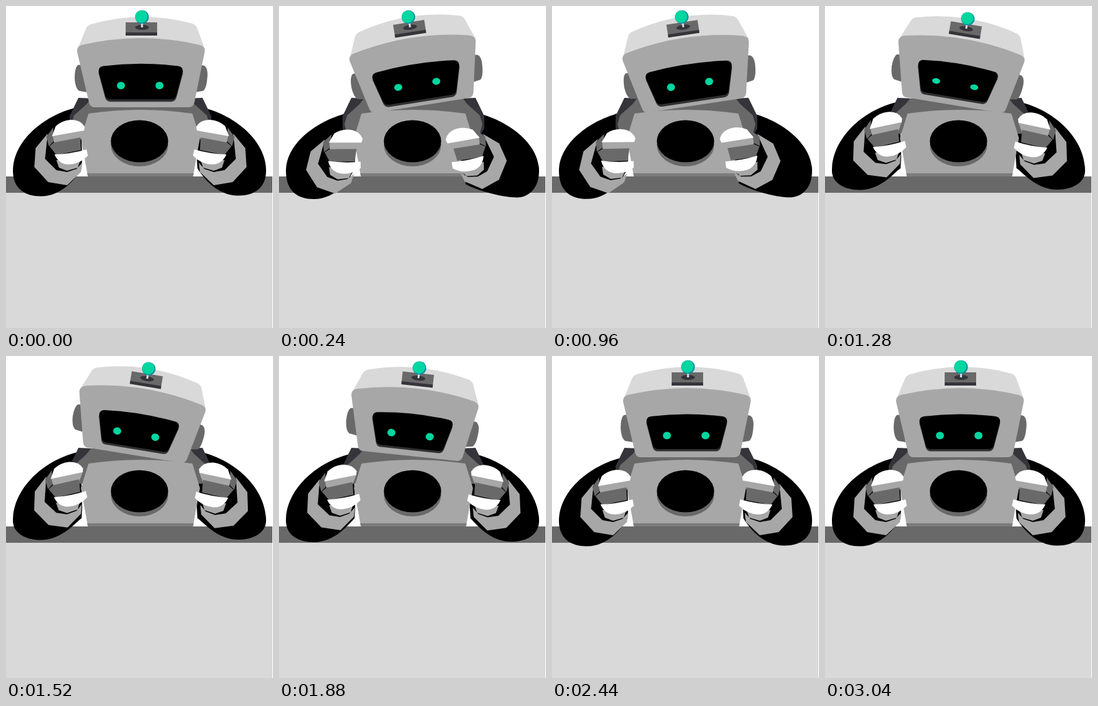
Recreate the animation shown at these times as an HTML page. Size 424 px wide and 512 px high, loop 3080 ms.

```html
<!DOCTYPE html>
<html lang="en">
<head>
<meta charset="utf-8">
<title>Robot at a desk</title>
<style>
  html, body { margin: 0; width: 100%; height: 100%; overflow: hidden; background: #fff; }
  svg { display: block; width: 424px; height: 512px; }
  .light { fill: #d9d9d9; }
  .mid { fill: #a7a7a7; }
  .deep { fill: #696969; }
  .ink { fill: #34343a; }
  .glow { fill: #00d6a0; }
  .white { fill: #fff; }
</style>
</head>
<body>
<svg viewBox="0 0 424 512">
  <defs>
    <g id="hand">
      <path d="M66 206L58 245L72 264L97 268L116 256L112 225L80 205Z"/>
      <path class="mid" d="M66 203L47 226L45 256L67 280L97 285L119 264L121 249L112 259L97 264L80 261L62 243L64 224Z"/>
      <path class="deep" d="M75 193L64 208L68 223L76 215Z"/>
      <path class="mid" d="M74 206L125 196L118 213L77 220Z"/>
      <path class="deep" d="M76 217L118 209L119 229L80 237L69 223Z"/>
      <path class="mid" d="M80 245L118 245L114 257L97 262L84 257Z"/>
      <path class="white" d="M73 207L79 191Q89 182 102 181Q118 180 125 192L124 198Z"/>
      <path class="white" d="M77 236Q104 235 128 228L130 238Q118 251 100 252Q84 252 77 236Z"/>
    </g>
    <g id="shoulder">
      <path class="ink" d="M139 147L115 146L101 175L101 195L109 208L125 190Z"/>
      <path class="deep" d="M216 147L135 147L128 156L108 174L104 188L108 203L216 203Z"/>
    </g>
    <path id="visor" d="M150 104Q150 97 157 96Q214 89 271 96Q278 97 278 104L268 142Q266 148 260 148L168 148Q162 148 160 142Z"/>
  </defs>

  <rect class="deep" y="271" width="423" height="27"/>
  <rect class="light" y="297" width="423" height="215"/>

  <path id="armL"/>
  <path id="armR" transform="matrix(-1 0 0 1 424 0)"/>

  <use href="#shoulder"/>
  <use href="#shoulder" transform="matrix(-1 0 0 1 427 0)"/>
  <path class="mid" d="M131 171Q213 159 296 171L308 210L297 271L130 271L119 210Z"/>
  <path fill="#7c7c7c" d="M129 266H298L297 271H130Z"/>
  <ellipse class="deep" cx="212" cy="221" rx="45.500" ry="34"/>
  <ellipse cx="212" cy="215" rx="45.500" ry="33.500"/>

  <use id="handL" href="#hand"/>
  <g id="handR"><use href="#hand" transform="matrix(-1 0 0 1 427 0)"/></g>

  <g id="head">
    <path class="deep" d="M122 93L114 94Q109 98 109 115Q110 131 116 135L128 137Z"/>
    <path class="deep" d="M307 93L315 95Q320 98 320 109Q319 131 313 135L301 137Z"/>
    <path class="light" d="M113 70L127 36Q129 31 135 29Q215 6 296 28Q302 30 304 36L316 69L215 80Z"/>
    <path class="mid" d="M113 73Q112 65 120 62Q215 40 308 62Q317 65 315.500 73L299 154Q297 161 290 161H140Q134 161 132 154Z"/>
    <path class="deep" d="M190 26H240V43H190Z"/>
    <path class="ink" d="M190 42H240V47H190Z"/>
    <ellipse class="ink" cx="216" cy="34" rx="11" ry="4"/>
    <path fill="#d5e5ef" d="M214.500 25H217.500V34H214.500Z"/>
    <circle fill="#0d8fa3" cx="216" cy="17.500" r="10.800"/>
    <circle class="glow" cx="215" cy="16.800" r="9.800"/>
    <g id="face">
      <use href="#visor" y="3.500" fill="#303033"/>
      <use href="#visor"/>
    </g>
    <ellipse class="glow eye" cx="182.500" cy="126.500" rx="6.400"/>
    <ellipse class="glow eye" cx="243.700" cy="126.500" rx="6.400"/>
  </g>
</svg>
<script>
const LOOP = 3080;
// [time, lean]: -1 leans left, 1 leans right
const LEAN = [[0, 0], [60, 0], [240, -1], [420, -1.06], [960, -.95], [1160, .08], [1280, 1],
              [1480, 1], [1880, .65], [2230, -.5], [2440, 0], [LOOP, 0]];
const EYE = [[0, 6], [240, 5.5], [960, 6], [1160, 6], [1280, 4.6], [1440, 6], [LOOP, 6]];
const VISOR = [[0, 1.045], [240, 1.09], [960, 1.08], [1280, 1], [LOOP, 1]];
const $ = id => document.getElementById(id);
const eyes = document.querySelectorAll('.eye');

function track(keys, t) {
  const i = keys.findIndex(k => k[0] > t);
  const [t0, v0] = keys[i - 1], [t1, v1] = keys[i];
  const u = (t - t0) / (t1 - t0);
  return v0 + (v1 - v0) * u * u * (3 - 2 * u);
}

const mix = (left, right, p) => p < 0 ? -p * left : p * right;

function arm(bottom, lift, reach) {
  return `M118 ${160 - lift}C60 ${172 - lift} 11 ${215 - lift / 2} 11 262
    C11 ${bottom - 12} 30 ${bottom} ${55 - 9 * reach} ${bottom}
    C${90 - 20 * reach} ${bottom} 112 ${bottom - 30 + 18 * reach} ${120 + 8 * reach} ${258 + 25 * reach}L121 240Z`;
}

function moveHand(id, cx, p, left, right) {
  const [x, y, turn] = left.map((v, i) => mix(v, right[i], p));
  $(id).setAttribute('transform', `translate(${x} ${y}) rotate(${turn} ${cx} 235)`);
}

function draw(now) {
  const t = now % LOOP, p = track(LEAN, t);
  const lift = mix(-8, 8, p);
  $('armL').setAttribute('d', arm(302.5 + mix(4.5, -10, p), lift, 0));
  $('armR').setAttribute('d', arm(301.5 + mix(3, -9.5, p), lift, Math.max(0, -p)));
  moveHand('handL', 85, p, [1, 12, 10], [-1, -12, -2]);
  moveHand('handR', 342, p, [-25, 5, -20], [3, -11, 2]);

  const squash = 1 - mix(.01, .03, p);
  $('head').setAttribute('transform',
    `translate(${-4 * p} ${mix(-1.2, 0, p)}) rotate(${mix(-9, 9.4, p)} 214 110) translate(0 60) scale(1 ${squash}) translate(0 -60)`);
  const size = track(VISOR, t);
  $('face').setAttribute('transform',
    `translate(214 ${122 + mix(2.5, 0, p)}) scale(${size} ${(1 + size) / 2}) translate(-214 -122)`);
  eyes.forEach(e => e.setAttribute('ry', track(EYE, t)));
  requestAnimationFrame(() => draw(performance.now()));
}
draw(0);
</script>
</body>
</html>
```
